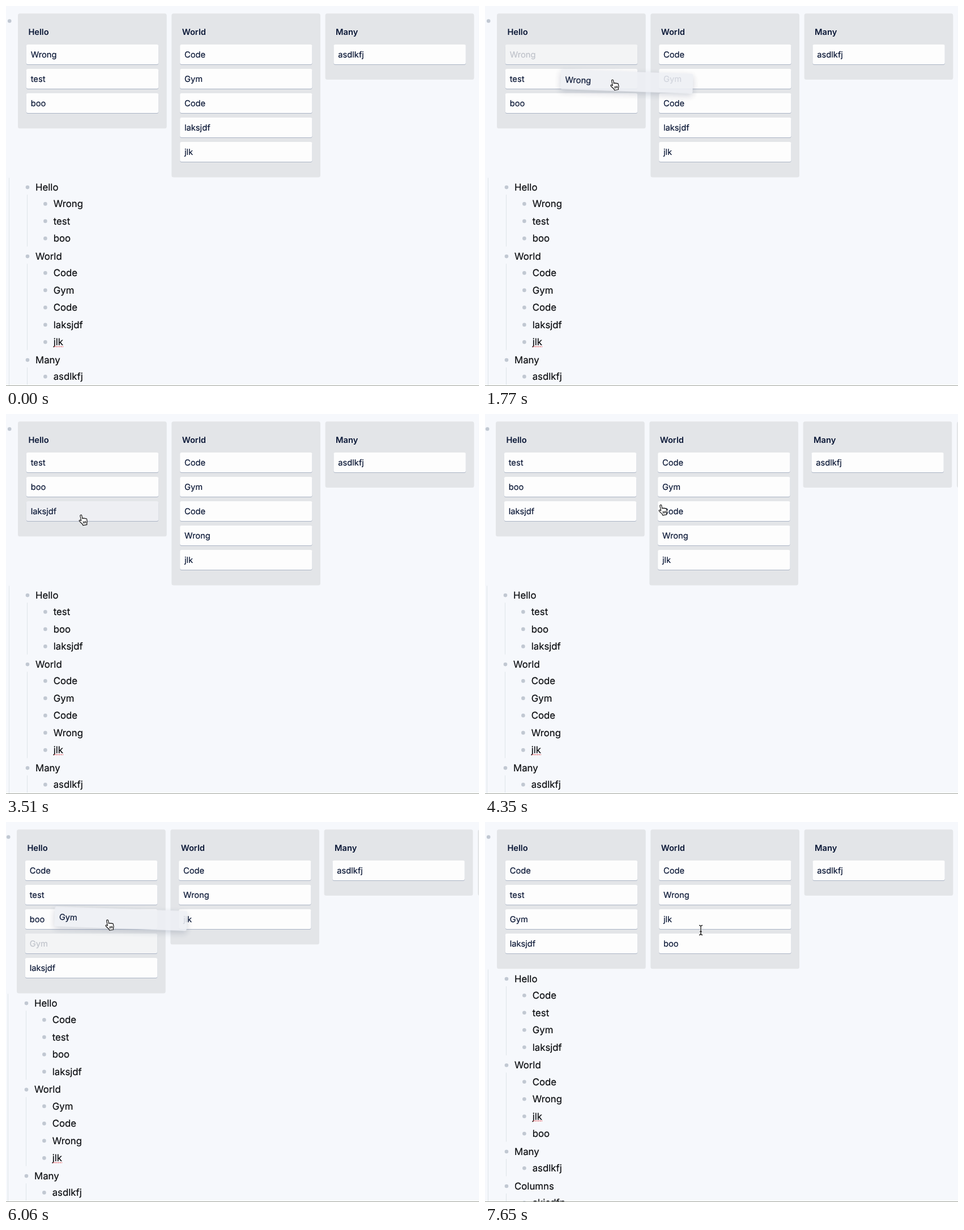
An HTML page for the animation above (7.71 s loop, 835 by 671 pixels).

```html
<!DOCTYPE html>
<html lang="en">
<head>
<meta charset="utf-8">
<title>Kanban board</title>
<style>
  html, body { margin: 0; width: 100%; height: 100%; overflow: hidden; background: #f6f8fc; }
  svg { display: block; font-family: Inter, sans-serif; text-rendering: geometricPrecision; }
  .head { font-size: 14.7px; font-weight: 600; fill: #0a1736; }
  .label { font-size: 14.7px; fill: #0a1736; stroke: #0a1736; stroke-width: .2px; }
  .row { font-size: 16.8px; fill: #0b0d10; stroke: #0b0d10; stroke-width: .2px; }
  .lift { filter: drop-shadow(0 4px 6px rgba(9, 30, 66, .2)); }
</style>
</head>
<body>
<svg id="stage" width="835" height="671" viewBox="0 0 835 671"></svg>
<script>
const stage = document.getElementById('stage');
const LOOP = 7710;
const TITLES = ['Hello', 'World', 'Many', 'Columns'];
const START = [
  ['Wrong', 'test', 'boo'],
  ['Code', 'Gym', 'Code', 'laksjdf', 'jlk'],
  ['asdlkfj'],
  ['akjsdfp']
];
const COL = { x: 21, y: 13.3, w: 262.7, step: 271.3 };
const CARD = { x: 35.8, y: 68, w: 233.4, h: 35, step: 43.1 };

// Pointer way points: time, x, y
const PATH = [
  [480, 330, 330], [1200, 129, 83], [1530, 129, 83], [2130, 405, 218],
  [2560, 405, 218], [3200, 140, 170], [3350, 140, 170], [3800, 120, 200],
  [4140, 150, 175], [4350, 312, 161], [4560, 370, 90], [4640, 370, 90],
  [5100, 92, 75], [5170, 92, 75], [5320, 92, 50], [5480, 92, 50],
  [5650, 400, 88], [5720, 400, 88], [6150, 153.5, 184], [6660, 153.5, 184],
  [6810, 163, 184], [7260, 381, 188], [7350, 381, 188], [7420, 381, 191]
];

// Each drag: press time, drop time, column and index of the card
const DRAGS = [
  { press: 1500, drop: 2190, col: 0, i: 0 },
  { press: 2520, drop: 3260, col: 1, i: 3 },
  { press: 4620, drop: 5150, col: 1, i: 0 },
  { press: 5700, drop: 6210, col: 1, i: 0 },
  { press: 6630, drop: 7320, col: 0, i: 2 }
];

const clamp = (v, lo, hi) => Math.max(lo, Math.min(hi, v));
const scrollX = t => t >= 3990 && t < 7380 ? -2 : 0;
const cardX = col => CARD.x + col * COL.step;
const cardY = i => Math.round(CARD.y + i * CARD.step);
const colEnd = n => 86.9 + 43.1 * n;

function pointer(t) {
  const k = PATH.findIndex(p => p[0] > t);
  if (k === 0) return { x: PATH[0][1], y: PATH[0][2] };
  if (k < 0) { const p = PATH[PATH.length - 1]; return { x: p[1], y: p[2] }; }
  const [t0, x0, y0] = PATH[k - 1], [t1, x1, y1] = PATH[k];
  const u = (t - t0) / (t1 - t0), s = u * u * (3 - 2 * u);
  return { x: x0 + (x1 - x0) * s, y: y0 + (y1 - y0) * s };
}

// Moves the dragged card to the slot below the pointer
function place(lists, drag, t) {
  const p = pointer(t), col = p.x < 288 ? 0 : 1;
  const out = lists.map(l => l.slice());
  if (col === drag.col) return { lists: out, col, i: drag.i };
  const [name] = out[drag.col].splice(drag.i, 1);
  const i = clamp(Math.round((p.y - 64.5) / 43), 0, out[col].length);
  out[col].splice(i, 0, name);
  return { lists: out, col, i };
}

function stateAt(t) {
  let saved = START;
  for (const drag of DRAGS) {
    if (t >= drag.drop) saved = place(saved, drag, drag.drop).lists;
    else if (t >= drag.press) return { saved, drag, ...place(saved, drag, t) };
  }
  return { saved, lists: saved, drag: null };
}

function cardAt(lists, p, off) {
  for (let col = 0; col < 3; col++) {
    const dx = p.x - off - cardX(col);
    if (dx < 0 || dx > CARD.w) continue;
    for (let i = 0; i < lists[col].length; i++) {
      const dy = p.y - cardY(i);
      if (dy >= 0 && dy <= CARD.h) return col + ':' + i;
    }
  }
  return null;
}

const rect = (x, y, w, h, r, fill) =>
  `<rect x="${x}" y="${y}" width="${w}" height="${h}" rx="${r}" fill="${fill}"/>`;
const text = (kind, x, y, str, alpha = 1) =>
  `<text class="${kind}" x="${x}" y="${y}" opacity="${alpha}">${str}</text>`;
const dot = (x, y) => `<circle cx="${x}" cy="${y}" r="3.3" fill="#c1c8d2"/>`;
const guide = (x, y0, y1) => `<path d="M${x} ${y0}V${y1}" stroke="#dfe5e9"/>`;

function card(x, y, name, fill, alpha) {
  return rect(x, y + 1, CARD.w, CARD.h, 3, '#abb4c5') +
    rect(x, y, CARD.w, CARD.h, 3, fill) + text('label', x + 7.9, y + 23.3, name, alpha);
}

function board(s, hover) {
  return s.lists.map((list, col) => {
    const x = COL.x + col * COL.step;
    let out = rect(x, COL.y, COL.w, colEnd(list.length) - COL.y, 3.5, '#e3e5e8') +
      text('head', x + 18.4, 51.2, TITLES[col]);
    list.forEach((name, i) => {
      const ghost = s.drag && s.col === col && s.i === i;
      const fill = ghost ? '#f3f4f5' : hover === col + ':' + i ? '#eeeff3' : '#fdfdfd';
      out += card(cardX(col), cardY(i), name, fill, ghost ? .22 : 1);
    });
    return out;
  }).join('');
}

function outline(s, t) {
  const top = Math.max(...s.lists.map(l => colEnd(l.length)));
  let y = top + 17.2, out = guide(5.5, top + 1, 671);
  s.saved.forEach((list, col) => {
    out += dot(38, y + .5) + text('row', 52, y + 6, TITLES[col]);
    out += guide(37.5, y + 13.5, y + 13.5 + 30.5 * list.length);
    list.forEach((name, i) => {
      const cy = y + 29.5 + i * 30.5;
      out += dot(69.4, cy + .3) + text('row', 83.7, cy + 6, name);
      if (name !== 'jlk') return;
      out += `<path d="M85 ${cy + 8.3}H101" stroke="#e5484d" stroke-width="1.5" stroke-dasharray="1.6 1.4"/>`;
      const blink = (t + 280) % 1060 >= 530;
      if (t < 1500 && blink) out += rect(101.3, cy - 9.5, 1.2, 19, 0, '#111');
    });
    y += 30.5 * (list.length + 1);
  });
  return out;
}

function lifted(s, p, off) {
  const { drag } = s, p0 = pointer(drag.press);
  const x = cardX(drag.col) + off + p.x - p0.x, y = cardY(drag.i) + p.y - p0.y;
  const name = s.saved[drag.col][drag.i];
  return `<g transform="rotate(2 ${x + CARD.w / 2} ${y + CARD.h / 2})">` +
    `<g class="lift" opacity=".88">${rect(x, y, CARD.w, CARD.h, 3, '#eef0f5')}</g>` +
    text('label', x + 7.9, y + 23.3, name) + '</g>';
}

const HAND = 'M3.5 1.9c0-1.9 2.8-1.9 2.8 0V7c.3-1 2.3-.9 2.5.4.5-.9 2.3-.7 2.4.7.6-.7 2.2-.4 2.2 1.1v3.6' +
  'c0 1.6-1.3 2.7-1.3 4.2v1.2H5.3v-1.2C4.8 15.2 2 12.8.8 10.3c-.8-1.6 1-2.3 2-1.1l.9 1z';
const BEAM = 'M-3-8.5q3 0 3 2.5V6q0 2.5-3 2.5M3-8.5q-3 0-3 2.5M0 6q0 2.5 3 2.5M-1.8 2.5h3.6';

function cursor(p, hand) {
  if (hand) return `<g transform="translate(${p.x - 2} ${p.y - .5}) rotate(-10) scale(1.06) translate(-4.9 -.5)" ` +
    `stroke="#111" stroke-width="1.1" stroke-linejoin="round"><path d="${HAND}" fill="#fff"/>` +
    '<path d="M6.9 11.8v3.6M8.9 11.8v3.6M10.9 11.8v3.6" fill="none"/></g>';
  return `<g transform="translate(${p.x} ${p.y})" fill="none"><path d="${BEAM}" stroke="#fff" stroke-width="2.8"/>` +
    `<path d="${BEAM}" stroke="#111" stroke-width="1.3"/></g>`;
}

function draw(t) {
  const s = stateAt(t), off = scrollX(t), p = pointer(t);
  const shown = t >= PATH[0][0];
  // The highlight trails the pointer a little
  const hover = shown && !s.drag ? cardAt(s.lists, pointer(t - 60), off) : null;
  let out = rect(0, 0, 835, 671, 0, '#f6f8fc') +
    `<g transform="translate(${off} 0)">${dot(6.2, 26.5)}${outline(s, t)}${board(s, hover)}</g>` +
    rect(0, 670, 835, 1, 0, '#a3a69c');
  if (s.drag) out += lifted(s, p, off);
  if (shown) out += cursor(p, s.drag || cardAt(s.lists, p, off));
  stage.innerHTML = out;
}

const begin = performance.now();
function tick() {
  draw((performance.now() - begin) % LOOP);
  requestAnimationFrame(tick);
}
tick();
</script>
</body>
</html>
```
